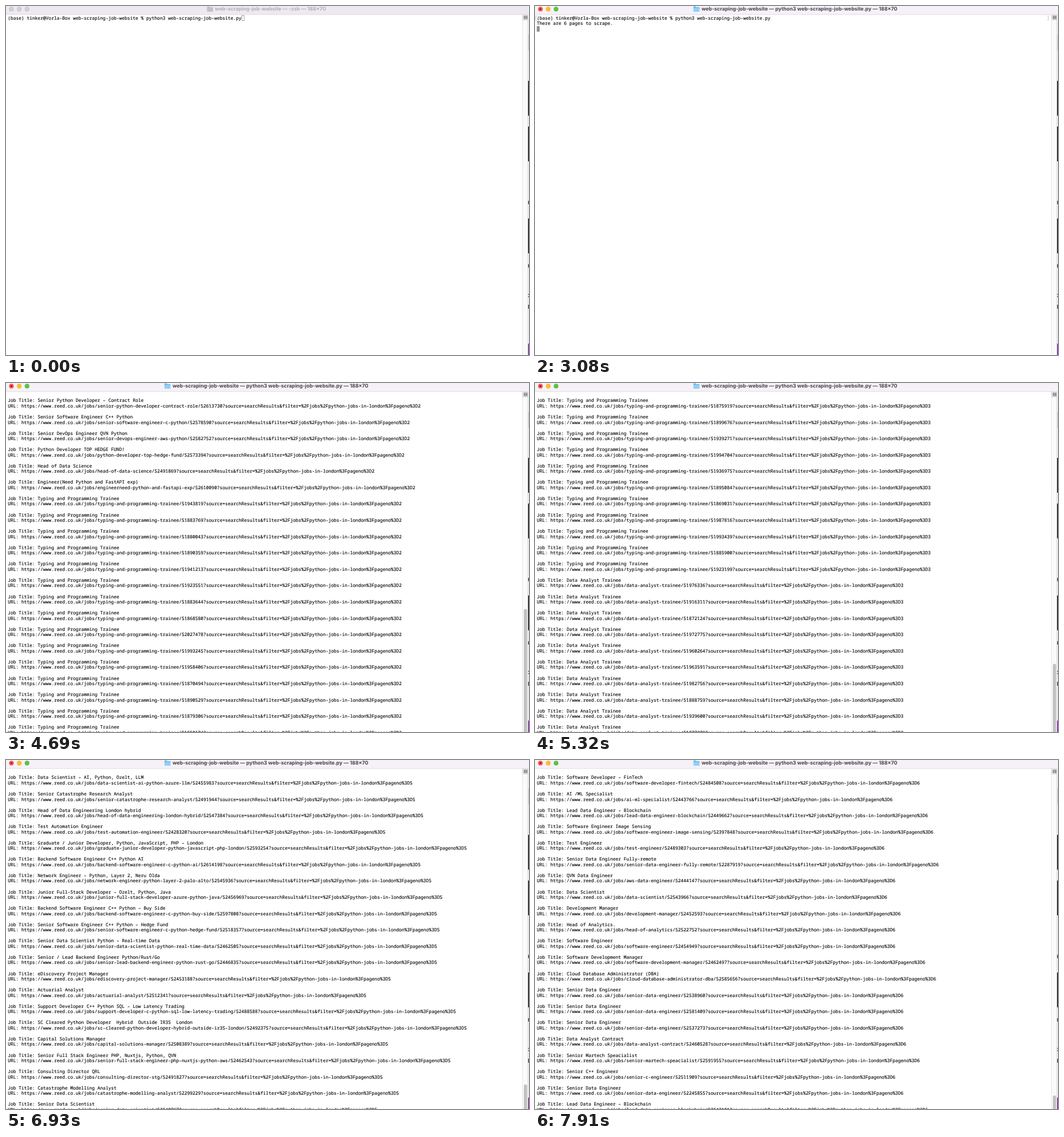
Write an HTML page that moves like this. It is 917x611 px and loops after 8000 ms.

```html
<!DOCTYPE html>
<html lang="en">
<head>
<meta charset="utf-8">
<title>Terminal</title>
<style>
html, body { margin: 0; width: 100%; height: 100%; overflow: hidden; background: #fff; }
svg { display: block; overflow: hidden; }
text { white-space: pre; text-rendering: geometricPrecision; }
#out { font: 500 7.943px "Noto Sans Mono", "DejaVu Sans Mono", monospace; font-variant-ligatures: none; stroke: #000; stroke-width: .12; }
#bar { fill: #f6f1f8; }
#title { font: 700 8.9px Inter, "Open Sans", sans-serif; fill: #474349; text-anchor: middle; }
#folder { fill: #62bdf2; }
#folder .tab { fill: #3f9fdc; }
#lights { stroke-width: .4; }
.red { fill: #f9574f; stroke: #e44b44; }
.amber { fill: #fbbd2f; stroke: #e5ab2a; }
.green { fill: #59c544; stroke: #4bb23a; }
#cursor { fill: #8e8e8e; stroke: #8e8e8e; stroke-width: .8; }
#dot, #marks { visibility: hidden; }
.idle #bar { fill: #eee9f0; }
.idle #title { fill: #b2adb4; }
.idle #folder, .idle #folder .tab { fill: #c5c0c7; }
.idle #lights circle { fill: #d4ced6; stroke: #aba6ad; }
.idle #cursor { fill: none; }
.run #folder { fill: #8fd0f6; }
.run #folder .tab { fill: #66b7e9; }
.run #dot, .mark #marks { visibility: visible; }
</style>
</head>
<body>
<svg width="917" height="611" viewBox="0 0 917 611">
  <g id="out"></g>
  <rect id="cursor" width="4.2" height="8.8"/>
  <path id="marks" d="M3 17.5H1.5V25H3M898.5 17.5H900V25H898.5" fill="none" stroke="#b4b4b4" stroke-width=".8"/>

  <rect x="905" y="15" width="10" height="596" fill="#fafafa"/>
  <path d="M905.5 15V611" stroke="#e6e6e6"/>
  <rect id="thumb" x="908" width="5.6" height="700" rx="2.8" fill="#c1c1c1"/>
  <rect x="906" y="15.5" width="9" height="9" fill="#f3f3f3" stroke="#c9c9c9" stroke-width=".8"/>
  <path d="M908.3 17.6H913.5V22.4H908.3ZM908.3 19.2H913.5M908.3 20.8H913.5" fill="none" stroke="#555" stroke-width=".8"/>

  <rect x="915" width="2" height="611" fill="#f4f4f4"/>
  <path d="M915.2 0V611" stroke="#c6c6c6" stroke-width=".8"/>
  <path d="M916 50V78" stroke="#d2d2d2" stroke-width="2"/>
  <path d="M916.3 131V192M916.3 211V272M916.3 372V433" stroke="#000" stroke-width="1.4"/>
  <path d="M916.3 341V347M916.3 452V458M916.3 504V505.5M916.3 508V509.5M916.3 523V530" stroke="#333" stroke-width="1.3"/>
  <path d="M916.3 591V611" stroke="#7d12a8" stroke-width="1.4"/>

  <rect id="bar" width="916" height="15"/>
  <path d="M0 15H915" stroke="#d9d3db" stroke-width=".8"/>
  <g id="lights">
    <circle class="red" cx="9.5" cy="5.4" r="3.9"/>
    <circle class="amber" cx="23.2" cy="5.4" r="3.9"/>
    <circle class="green" cx="36.9" cy="5.4" r="3.9"/>
  </g>
  <circle id="dot" cx="9.5" cy="5.4" r="1.4" fill="#7c130d"/>
  <g id="folder">
    <path class="tab" d="M0 1.8Q0 .8 1 .8H3.8L5 1.9H9.6Q10.6 1.9 10.6 2.9V5H0Z"/>
    <path d="M0 3.2H10.6V9Q10.6 9.9 9.6 9.9H1Q0 9.9 0 9Z"/>
  </g>
  <text id="title" x="463.6" y="8.3"></text>
</svg>
<script>
const $ = id => document.getElementById(id);
const LOOP = 8000, COL = 4.766, ROW = 9.532, ROWS = 70, LINES_PER_PAGE = 80;
const LEFT = 3.2, BASELINE = 23.85;
const NAME = "web-scraping-job-website";
const PROMPT = `(base) tinker@Vorla-Box ${NAME} % python3 ${NAME}.py`;

// One entry per line: title | ids | slug when it differs from the title
const LISTS = [`Python Developer|52575396 52617922 52599958 52614307
Python Engineer|52487573
Python Developer|52497797 52497873 52557019
Senior Python Engineer|52487690 52462393
Python/Django Developer|52593514
Senior Python Developer|52603304
Senior Python Engineer|52412470
Junior Python Quant|52492734
Python Pricing Modeller|52565360
Python Backend Engineer|52563175
Software Engineer – Python & C++|52443706
Senior Software Engineer Python|52569147
Python Developer / Team Lead|52495756
Senior Backend Developer Python|52494524
Full Stack Engineer Python|52497885`,
`Senior Python Developer – Contract Role|52613730
Senior Software Engineer C++ Python|52578590
Senior DevOps Engineer QVN Python|52582752|senior-devops-engineer-aws-python
Python Developer TOP HEDGE FUND!|52573394
Head of Data Science|52491869
Engineer(Need Python and FastAPI exp)|52610090
Typing and Programming Trainee|51943819 51883769 51880043 51890359 51941213 51923551 51883644 51868580 52027478 51993245 51958406 51870494 51890529 51879306 51950174`,
`Typing and Programming Trainee|${trainees(1, 11)}
Data Analyst Trainee|${trainees(12, 10)}`,
`Data Analyst Trainee|51890509 51890362 51879318 51958296 51941224 51879883 51868590 51996453 51958363 51879459 51919444 51868769 51996617 51996431 51958928
Software Engineer, React, TypeScript, NextJS, Python|52565484
Data Analyst Trainee|51924655 51879760 51962352 51961479
Tech Lead, Python Django – Full stack|52219951`,
`Data Scientist – AI, Python, Ozelt, LLM|52455983|data-scientist-ai-python-azure-llm
Senior Catastrophe Research Analyst|52491944
Head of Data Engineering London hybrid|52547384
Test Automation Engineer|52428320
Graduate / Junior Developer, Python, JavaScript, PHP – London|52593254
Backend Software Engineer C++ Python AI|52614198
Network Engineer – Python, Layer 2, Neru Olda|52545936|network-engineer-python-layer-2-palo-alto
Junior Full-Stack Developer – Ozelt, Python, Java|52456969|junior-full-stack-developer-azure-python-java
Backend Software Engineer C++ Python – Buy Side|52597808
Senior Software Engineer C++ Python – Hedge Fund|52518357
Senior Data Scientist Python – Real-time Data|52462505
Senior / Lead Backend Engineer Python/Rust/Go|52446835
eDiscovery Project Manager|52453188
Actuarial Analyst|52512341
Support Developer C++ Python SQL – Low Latency Trading|52488588
SC Cleared Python Developer  Hybrid  Outside IR35  London|52492375
Capital Solutions Manager|52508389
Senior Full Stack Engineer PHP, Nuxtjs, Python, QVN|52462543|senior-full-stack-engineer-php-nuxtjs-python-aws
Consulting Director QRL|52491827|consulting-director-stg
Catastrophe Modelling Analyst|52299229
Senior Data Scientist|52540767`,
`Software Developer – FinTech|52484508
AI /ML Specialist|52443766
Lead Data Engineer – Blockchain|52449662
Software Engineer Image Sensing|52397848
Test Engineer|52489303
Senior Data Engineer Fully-remote|52287919
QVN Data Engineer|52444147|aws-data-engineer
Data Scientist|52543966
Development Manager|52452593
Head of Analytics.|52522752
Software Engineer|52454949
Software Development Manager|52462497
Cloud Database Administrator (DBA)|52585656
Senior Data Engineer|52538960 52581409 52537273
Data Analyst Contract|52460528
Senior Martech Speacialist|52591955
Senior C++ Engineer|52511909
Senior Data Engineer|52245855
Lead Data Engineer – Blockchain|52543101`];

function trainees(from, count) {
  return Array.from({ length: count }, (_, i) => 51868000 + (from + i) ** 2 * 7919 % 129000).join(" ");
}

function slugify(title) {
  return title.toLowerCase().replace(/[()]/g, "").replace(/[^a-z0-9]+/g, "-").replace(/^-|-$/g, "");
}

function pageText(list, index) {
  const page = index ? `%3Fpageno%3D${index + 1}` : "";
  return "\n" + list.split("\n").flatMap(line => {
    const [title, ids, slug = slugify(title)] = line.split("|");
    return ids.split(" ").map(id => `Job Title: ${title}\nURL: https://www.reed.co.uk/jobs/${slug}/${id}` +
      `?source=searchResults&filter=%2Fjobs%2Fpython-jobs-in-london${page}\n`);
  }).join("\n");
}

const shell = { title: "-zsh", text: PROMPT, cursor: [PROMPT.length, 0], icon: 352.5 };
const running = { title: `python3 ${NAME}.py`, icon: 277.8, look: "run mark" };
const entered = { ...shell, cursor: [0, 1], look: "mark" };
const started = { ...entered, ...running };
const pageStarts = [3850, 4690, 5250, 5950, 6860, 7630];
const scenes = [
  { at: 0, ...shell, look: "idle" },
  { at: 1820, ...shell, look: "" },
  { at: 2170, ...entered },
  { at: 2310, ...started },
  { at: 3080, ...started, text: PROMPT + "\nThere are 6 pages to scrape.", cursor: [0, 2] },
  ...LISTS.map((list, i) => ({
    at: pageStarts[i], ...running, look: "run", text: pageText(list, i), lines: LINES_PER_PAGE * (i + 1)
  }))
];

function place(el, attrs) {
  for (const key in attrs) el.setAttribute(key, attrs[key]);
  return el;
}

function textRow(line, row) {
  const el = document.createElementNS("http://www.w3.org/2000/svg", "text");
  el.textContent = line;
  return place(el, { x: LEFT, y: BASELINE + row * ROW });
}

function show({ title, text, cursor, icon, look, lines }) {
  const [col, row] = cursor || [0, ROWS];
  document.body.className = look;
  $("out").replaceChildren(...text.split("\n").map(textRow));
  $("title").textContent = `${NAME} — ${title} — 188×70`;
  place($("folder"), { transform: `translate(${icon} 0)` });
  place($("cursor"), { x: LEFT + .4 + col * COL, y: 16.7 + row * ROW });
  place($("thumb"), { y: lines ? 26 + 657 * (1 - ROWS / lines) : 700 });
}

let current;
function tick() {
  const t = performance.now() % LOOP;
  const scene = scenes.filter(s => s.at <= t).pop();
  if (scene !== current) show(current = scene);
  requestAnimationFrame(tick);
}
tick();
</script>
</body>
</html>
```
